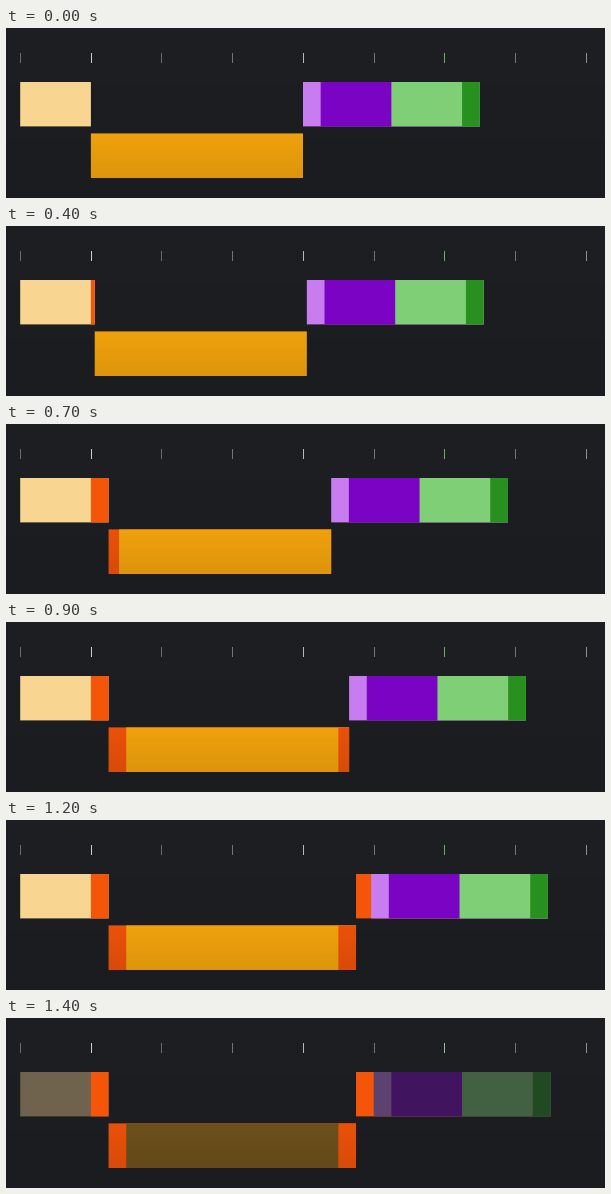
These frames come from a looping animation (599 px wide and 170 px high, 1500 ms). A matplotlib script:

```python
import numpy as np
import matplotlib.pyplot as plt
from matplotlib.animation import FuncAnimation
from matplotlib.colors import to_rgb
from matplotlib.patches import Rectangle

W, H, DPI = 599, 170, 100
FRAMES, STEP = 15, 100
LEFT, UNIT = 14.2, 70.7
GAP = UNIT / 4
TOP_ROW, LOW_ROW = (54, 98.4), (105.4, 150)

BG = np.array(to_rgb("#1e1f23"))
BG_LOW = np.array(to_rgb("#1a1c20"))
BEIGE, AMBER = "#f9d592", "#efa10d"
LILAC, PURPLE = "#c77cf0", "#7b03c4"
GREEN, FOREST = "#7fcf77", "#27901f"
RED, DEEP_RED = "#f45508", "#e9510a"


def travel(t, start=245, accel=280, decel=320, total=4 * GAP):
    """Distance covered with a soft start, steady middle and soft stop."""
    end = 1335
    speed = total / (end - start - (accel + decel) / 2)
    if t <= start:
        return 0.0
    if t >= end:
        return total
    if t < start + accel:
        return speed * (t - start) ** 2 / (2 * accel)
    if t > end - decel:
        return total - speed * (end - t) ** 2 / (2 * decel)
    return speed * (t - start - accel / 2)


def mix(a, b, k):
    return (1 - k) * np.array(to_rgb(a)) + k * np.array(to_rgb(b))


fig = plt.figure(figsize=(W / DPI, H / DPI), dpi=DPI, facecolor=BG)
ax = fig.add_axes([0, 0, 1, 1])
ax.axis("off")

ramp = np.linspace(0, 1, H)[:, None, None]
ax.imshow(BG + (BG_LOW - BG) * ramp, extent=(0, W, H, 0), aspect="auto", zorder=0)

shade = np.zeros((45, 1, 4))
shade[:, 0, 3] = np.linspace(0, 0.075, 45)
shadow = ax.imshow(shade, extent=(85, 297, LOW_ROW[1], LOW_ROW[0]),
                   aspect="auto", interpolation="nearest", zorder=4)
ax.set_xlim(0, W)
ax.set_ylim(H, 0)


def box(x, y, w, h, color, z=2):
    return ax.add_patch(Rectangle((x, y), w, h, facecolor=color, linewidth=0,
                                  snap=False, zorder=z))


tick_grays = [0.42, 0.80, 0.42, 0.46, 0.72, 0.46, 0.76, 0.46, 0.56]
ticks = [box(round(LEFT + i * UNIT - 0.2), 25, 1, 10, (g, g, g))
         for i, g in enumerate(tick_grays)]


def make_row(rows, colors):
    top, bottom = rows
    return [box(0, top, 1, bottom - top, c) for c in colors]


head_colors = [BEIGE, RED]
low_colors = [DEEP_RED, AMBER, DEEP_RED]
tail_colors = [RED, LILAC, PURPLE, GREEN, FOREST]
head = make_row(TOP_ROW, head_colors)
low = make_row(LOW_ROW, low_colors)
tail = make_row(TOP_ROW, tail_colors)


def lay_out(row, colors, widths, x, glow):
    """Place blocks end to end; each reaches the row end so no seams show."""
    end = x + sum(widths)
    for patch, color, width in zip(row, colors, widths):
        patch.set_x(x)
        patch.set_width(end - x)
        patch.set_visible(width > 0)
        lasting = color in (RED, DEEP_RED)
        patch.set_facecolor(color if lasting else mix(BG, color, glow))
        x += width
    return end


def draw(i):
    t = i * STEP
    moved = travel(t)
    gaps = [min(max(moved - k * GAP, 0), GAP) for k in range(4)]
    glow = min(1, max(0, 1 - (t - 1250) / 240))

    x = lay_out(head, head_colors, [UNIT, gaps[0]], LEFT, glow)
    end = lay_out(low, low_colors, [gaps[1], 3 * UNIT, gaps[2]], x, glow)
    lay_out(tail, tail_colors, [gaps[3], GAP, UNIT, UNIT, GAP], end, glow)
    shadow.set_extent((x, end, LOW_ROW[1], LOW_ROW[0]))
    ticks[6].set_facecolor(mix("#c4c4c4", "#5cb85a", glow))
    return [*head, *low, *tail, shadow, ticks[6]]


anim = FuncAnimation(fig, draw, frames=FRAMES, interval=STEP,
                     repeat=True, repeat_delay=0, blit=False)
plt.show()
```
